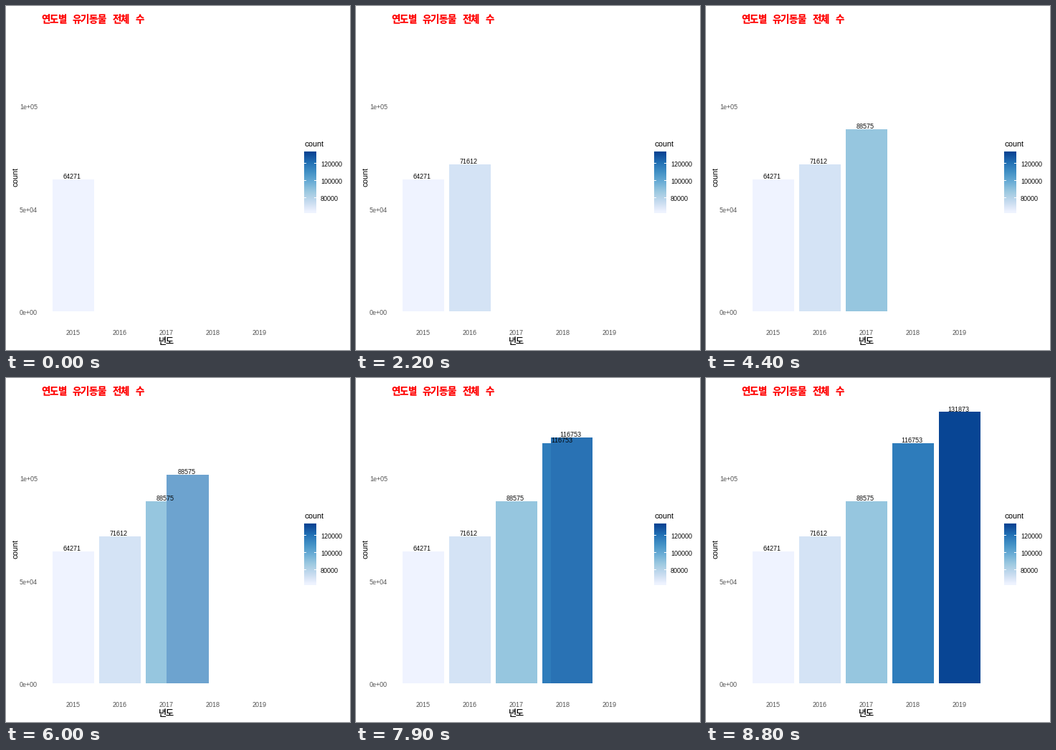
Recreate the animation shown at these times as a matplotlib script. Size 480 by 480 pixels, loop 10 s.

```python
import numpy as np
import matplotlib.pyplot as plt
from matplotlib.animation import FuncAnimation
from matplotlib.patches import Rectangle

# Whole-pixel glyph advances without kerning, for crisp small text
plt.rcParams.update({
    "font.family": "Liberation Sans",
    "text.hinting": "native",
    "text.hinting_factor": 1,
    "text.kerning_factor": 6,
    "toolbar": "None",
})

SIZE, DPI = 480, 72
YEARS = range(2015, 2020)
COUNTS = [64271, 71612, 88575, 116753, 131873]
BLUES = ["#EFF3FF", "#C6DBEF", "#9ECAE1", "#6BAED6",
         "#4292C6", "#2171B5", "#084594"]
KOREAN = "Noto Sans CJK JP"

# Plot geometry in pixels, y pointing down
BASE, PER_COUNT = 426.3, 0.0028735
FIRST_X, STEP_X, BAR_W = 94, 65, 58.5

# Timing in ticks of 100 ms
TICK, TICKS = 100, 100
HOLD, MOVE = 12, 11
CYCLE = 2 * MOVE

RGB_XYZ = np.array([[0.4124, 0.3576, 0.1805],
                    [0.2126, 0.7152, 0.0722],
                    [0.0193, 0.1192, 0.9505]])
WHITE = RGB_XYZ.sum(axis=1)
XYZ_LAB = np.array([[0, 116, 0], [500, -500, 0], [0, 200, -200]])


def to_lab(color):
    c = np.array([int(color[k:k + 2], 16) for k in (1, 3, 5)]) / 255
    lin = np.where(c > 0.04045, ((c + 0.055) / 1.055) ** 2.4, c / 12.92)
    t = RGB_XYZ @ lin / WHITE
    f = np.where(t > 0.008856, np.cbrt(t), 7.787 * t + 16 / 116)
    return XYZ_LAB @ f - [16, 0, 0]


def to_rgb(lab):
    f = np.linalg.solve(XYZ_LAB, lab + np.array([16, 0, 0]))
    t = np.where(f > 0.2069, f ** 3, (f - 16 / 116) / 7.787)
    lin = np.clip(np.linalg.solve(RGB_XYZ, t * WHITE), 0, 1)
    c = np.where(lin > 0.0031308, 1.055 * lin ** (1 / 2.4) - 0.055, 12.92 * lin)
    return np.clip(c, 0, 1)


STOPS = np.array([to_lab(c) for c in BLUES])


def share(count):
    return (count - COUNTS[0]) / (COUNTS[-1] - COUNTS[0])


def scale_lab(u):
    at = np.linspace(0, 1, len(STOPS))
    return np.array([np.interp(u, at, ch) for ch in STOPS.T])


def mix(a, b, p):
    return a + (b - a) * p


def y_of(count):
    return BASE - count * PER_COUNT


fig = plt.figure(figsize=(SIZE / DPI, SIZE / DPI), dpi=DPI, facecolor="white")
ax = fig.add_axes([0, 0, 1, 1])
ax.axis("off")


def box(x0, y0, x1, y1, color, z=1):
    return ax.add_patch(Rectangle((x0, y0), x1 - x0, y1 - y0, fc=color,
                                  lw=0, antialiased=False, zorder=z))


def label(x, y, text, size=9, color="black", ha="left", **kw):
    return ax.text(x, y, text, size=size, color=color, ha=ha,
                   va="baseline", **kw)


def draw_title():
    x, syllable, gap = 49, 12, 8
    for word in "연도별 유기동물 전체 수".split():
        label(x, 23, word, 13.4, "red", family=KOREAN, weight="bold")
        x += syllable * len(word) + gap


def draw_axes():
    grey = "#4D4D4D"
    label(213, 472, "년도", 12, family=KOREAN)
    label(16, 238, "count", 11, ha="center", rotation=90,
          rotation_mode="anchor")
    for i, year in enumerate(YEARS):
        label(FIRST_X + STEP_X * i, 459, str(year), color=grey, ha="center")
    for count in (0, 50000, 100000):
        label(44, round(y_of(count) + 5), f"{count:.0e}", color=grey,
              ha="right")


def draw_legend():
    x0, x1, top, bottom = 416, 433, 203, 289
    height, bins = 86.4, 20
    label(x0, 196, "count", 11)
    p = (bottom - np.arange(top, bottom) - 0.3) / height
    u = np.clip((p * bins - 0.5) / (bins - 1), 0, 1)
    rows = np.array([[to_rgb(scale_lab(v))] for v in u])
    ax.imshow(rows, extent=(x0, x1, bottom, top), aspect="auto",
              interpolation="nearest", zorder=1)
    for count in (80000, 100000, 120000):
        y = bottom + 0.2 - height * (0.5 + (bins - 1) * share(count)) / bins
        row = int(y)
        box(x0, row, x0 + 3, row + 1, "white", 2)
        box(x1 - 3, row, x1, row + 1, "white", 2)
        label(439, round(y + 4.4), str(count))


draw_title()
draw_axes()
draw_legend()
ax.set_xlim(0, SIZE)
ax.set_ylim(SIZE, 0)

LABS = [scale_lab(share(c)) for c in COUNTS]
bars = [box(0, 0, 1, 1, "white", 3 + i) for i in range(len(COUNTS))]
tags = [label(0, 0, "", zorder=10 + i) for i in range(len(COUNTS))]


def place(i, p):
    """Put bar i at share p of its way from the bar before it."""
    prev = max(i - 1, 0)
    x = FIRST_X + STEP_X * mix(prev, i, p)
    y = y_of(mix(COUNTS[prev], COUNTS[i], p))
    left, right, top = round(x - BAR_W / 2), round(x + BAR_W / 2), round(y)
    bars[i].set_bounds(left, top, right - left, round(BASE) - top)
    bars[i].set_facecolor(to_rgb(mix(LABS[prev], LABS[i], p)))
    text = str(COUNTS[i] if p > 0.5 else COUNTS[prev])
    tags[i].set_text(text)
    tags[i].set_position((round(x - 2.8 * len(text)), round(y - 0.7)))


def update(tick):
    for i in range(len(COUNTS)):
        start = HOLD + CYCLE * (i - 1)
        p = min(max((tick - start + 1) / MOVE, 0), 1)
        bars[i].set_visible(p > 0)
        tags[i].set_visible(p > 0)
        place(i, p)
    return bars + tags


anim = FuncAnimation(fig, update, frames=TICKS, interval=TICK,
                     init_func=lambda: update(0), repeat=True,
                     repeat_delay=0, blit=False)
plt.show()
```
